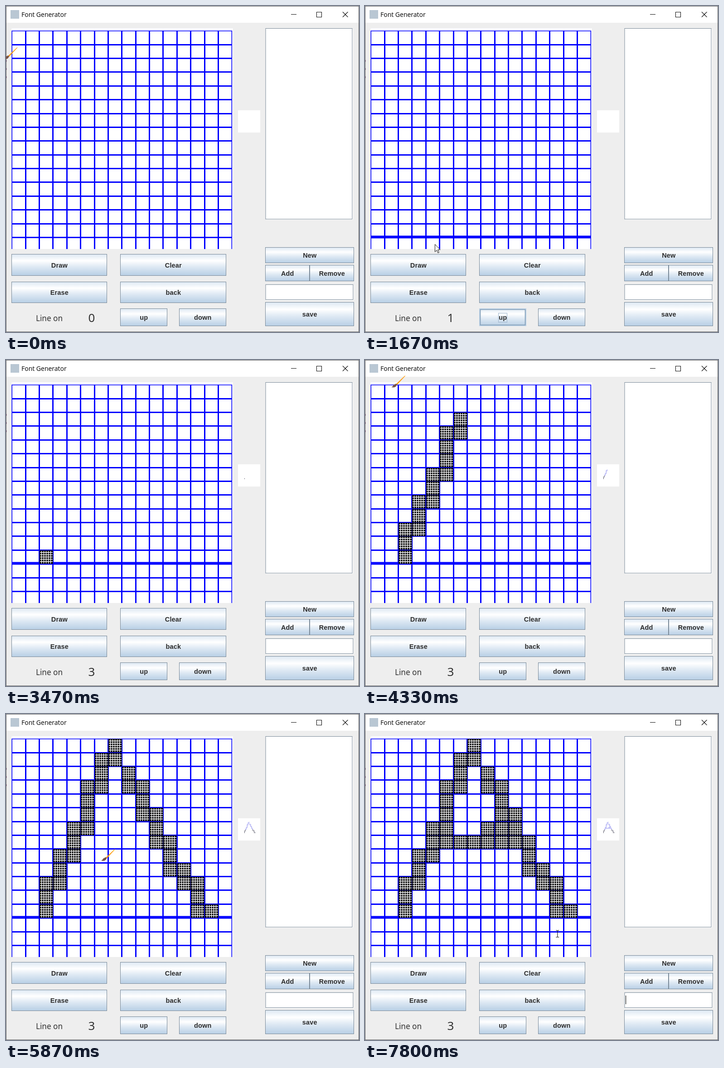
Recreate the animation shown at these times as an HTML page. Size 779 by 719 pixels, loop 8000 ms.

```html
<!DOCTYPE html>
<html lang="en">
<head>
<meta charset="utf-8">
<title>Font Generator</title>
<style>
  html, body { margin: 0; width: 100%; height: 100%; overflow: hidden; background: #eee; }
  svg { display: block; width: 779px; height: 719px; }
  .title { font: 14px "Open Sans", "Noto Sans", sans-serif; }
  .button { font: bold 14.5px "Liberation Sans", Arial, sans-serif; letter-spacing: .15px; fill: #2b2b2b; text-anchor: middle; }
  .label { font-family: "Noto Sans", "Open Sans", sans-serif; fill: #333; text-anchor: middle; }
</style>
</head>
<body>
<svg id="stage" viewBox="0 0 779 719" xmlns="http://www.w3.org/2000/svg">
  <defs>
    <linearGradient id="ocean" x1="0" y1="0" x2="0" y2="1">
      <stop offset="0" stop-color="#dde8f3"/>
      <stop offset=".3" stop-color="#fff"/>
      <stop offset=".6" stop-color="#dde8f3"/>
      <stop offset="1" stop-color="#b8cfe5"/>
    </linearGradient>
    <clipPath id="panel"><rect x="12" y="49" width="489" height="487"/></clipPath>
  </defs>
</svg>
<script>
const stage = document.getElementById('stage');
const LOOP = 8000, FPS = 15, STEPS = LOOP * FPS / 1000;
const CELL = 30.38, LEFT = 12.8, TOP = 54.8, BOTTOM = 536;
const BLUE = '#00f', EDGE = '#7a8a99';

function add(tag, attrs, parent = stage, text = '') {
  const node = document.createElementNS(stage.namespaceURI, tag);
  for (const key in attrs) node.setAttribute(key, attrs[key]);
  node.textContent = text;
  parent.appendChild(node);
  return node;
}
const rect = (x, y, width, height, fill, more, parent) =>
  add('rect', { x, y, width, height, fill, ...more }, parent);
const path = (d, more, parent) => add('path', { d, fill: 'none', ...more }, parent);
const show = (node, on) => node.setAttribute('visibility', on ? 'visible' : 'hidden');
const colX = col => Math.floor(LEFT + col * CELL) + .5;
const rowY = row => Math.floor(TOP + row * CELL) + .5;

// Window frame and title bar
rect(0, 0, 779, 719, '#eee');
rect(0, 0, 779, 37, '#fff');
rect(10, 9, 19, 19, '#b9c7d3');
add('text', { x: 34, y: 24, class: 'title' }, stage, 'Font Generator');
path('M629 18.5h12M685.5 13.5h11v11h-11zM743 13l11.5 11.5M754.5 13l-11.5 11.5', { stroke: '#111', 'stroke-width': 1.1 });
rect(.5, .5, 778, 718, 'none', { stroke: '#666' });
for (let i = 0; i < 3; i++) rect(0, 119 + 18 * i, 1.2, 4, '#4a2848');

// Drawing panel
rect(12.5, 49, 488, 487, '#fff');
const panel = add('g', { 'clip-path': 'url(#panel)' });
let lines = '';
for (let i = 1; i < 16; i++) lines += `M${colX(i)} ${TOP}V${BOTTOM}M13 ${rowY(i)}H499`;
path(lines, { stroke: BLUE, 'stroke-width': 3 }, panel);
path(`M13.2 ${BOTTOM}V55H498.3V${BOTTOM}`, { stroke: BLUE, 'stroke-width': 1.6 }, panel);
const baseline = rect(13, 0, 486, 6, BLUE, {}, panel);

// Preview, list and text field
rect(512, 230, 49, 49, '#fff');
rect(574, 50.5, 192, 421, '#fff');
rect(573, 49.5, 191, 420.5, '#fff', { stroke: EDGE });
const field = { x: 573, y: 614, w: 193, h: 34 };
rect(573, 614.5, 193, 33, '#fff', { stroke: EDGE });
path('M574 648.5H767.5V615', { stroke: '#fff' });
const caret = rect(575, 621, 1.2, 19, '#222');

// Buttons
const buttons = [];
function addButton(text, x, y, w, h) {
  const body = rect(x + .5, y + .5, w - 1, h - 1, 'url(#ocean)', { stroke: EDGE });
  const glow = add('g', {});
  rect(x + 1, y + 1, w - 2, h - 2, 'none', { stroke: '#b8cfe5', 'stroke-width': 2 }, glow);
  rect(x + 2.5, y + 2.5, w - 5, h - 5, 'none', { stroke: '#7f9ab3', 'stroke-width': 1.5 }, glow);
  const dent = path(`M${x + 1} ${y + h}V${y + 1}H${x + w}`, { stroke: EDGE, 'stroke-width': 2 });
  add('text', { x: x + w / 2 + .3, y: y + h / 2 + 5.5, class: 'button' }, stage, text);
  buttons.push({ x, y, w, h, body, glow, dent });
}
['Draw', 'Erase'].forEach((text, i) => addButton(text, 12, 547 + 61 * i, 211, 48 - i));
['Clear', 'back'].forEach((text, i) => addButton(text, 252, 547 + 61 * i, 234, 48 - i));
['up', 'down'].forEach((text, i) => addButton(text, 252 + 130 * i, 667, 104, 39));
['Add', 'Remove'].forEach((text, i) => addButton(text, 572 + 98 * i, 571, 98, 36));
addButton('New', 572, 532, 196, 35);
addButton('save', 572, 653, 196, 53);
const focusBox = rect(294.5, 677.5, 19, 20, 'none', { stroke: '#9db5cc' });
add('text', { x: 95.5, y: 694.5, class: 'label', 'font-size': 17.2 }, stage, 'Line on');
const counter = add('text', { x: 189, y: 697, class: 'label', 'font-size': 26 });

// The hand's route over the window: step, x, y, and whether the pen is down from there
const route = [
  [0, 142, 169], [2, 145, 167], [5, 145, 167], [8, 60, 305],
  [14, 60, 400], [15, 320, 545], [17, 376, 643], [21, 343, 697], [37, 343, 697],
  [40, 290, 560], [45, 128, 360], [46, 60, 380],
  [51, 80, 438, true], [57, 101, 389, true], [61, 165, 246, true], [65, 221.5, 98, true], [69, 235, 68],
  [71, 262, 120, true], [84, 441, 445], [87, 441, 445],
  [96, 173, 287, true], [98, 171, 283, true], [99, 228, 272, true], [103, 300, 270, true], [105, 300, 262, true], [107, 270, 260],
  [108, 400, 380], [111, 710, 585], [113, 688, 640], [115, 681, 646], [STEPS, 681, 646]
];
const clicks = [[23, 25], [30, 31], [34, 36]];
const TYPING = 116;

function handAt(k) {
  const next = Math.max(1, route.findIndex(key => key[0] >= k));
  const [k0, x0, y0, pen] = route[next - 1], [k1, x1, y1] = route[next];
  const u = (k - k0) / (k1 - k0);
  return { x: x0 + (x1 - x0) * u, y: y0 + (y1 - y0) * u, pen };
}
const inside = (p, box) => p.x >= box.x && p.x < box.x + box.w && p.y >= box.y && p.y < box.y + box.h;

// Every square the pen enters is filled shortly afterwards
function addCell(col, row) {
  const group = add('g', {});
  const x = colX(col), y = rowY(row);
  rect(x + .5, y + .5, 29.5, 29.5, '#050505', {}, group);
  let mesh = '';
  for (let i = 1; i < 6; i++) mesh += `M${x + 5 * i} ${y + 1.5}v28M${x + 1.5} ${y + 5 * i}h28`;
  path(mesh, { stroke: '#fff', 'stroke-width': 1.3 }, group);
  rect(522 + 1.93 * col, 238 + 1.93 * row, 1.2, 1.2, row > 8 ? '#222238' : '#6060e8', {}, group);
  return group;
}
const cells = new Map();
for (let k = 0; k < STEPS; k += .02) {
  const { x, y, pen } = handAt(k);
  const col = Math.floor((x - LEFT) / CELL), row = Math.floor((y - TOP) / CELL);
  const id = row * 16 + col;
  if (pen && !cells.has(id)) cells.set(id, { at: k + .6, node: addCell(col, row) });
}
const firstPaint = Math.min(...[...cells.values()].map(cell => cell.at));

// Pointers, each drawn around its own origin
const pointers = { brush: add('g', {}), arrow: add('g', {}), beam: add('g', {}) };
path('M.5 -.5L-18 19.5L-20 17.5L-1 -.5Z', { fill: '#ff9b0b' }, pointers.brush);
path('M-18 19L-20.5 17L-26 20Q-27 23 -30.5 24.5Q-24 26.5 -20.5 23Z', { fill: '#775348' }, pointers.brush);
path('M0 0V16.5L4 13L6.5 19L9 18L6.4 12H11.5Z', { fill: '#fff', stroke: '#111' }, pointers.arrow);
path('M-3.5 -7.5H-1L0 -6.5L1 -7.5H3.5M0 -6.5V6.5M-3.5 7.5H-1L0 6.5L1 7.5H3.5', { stroke: '#111', 'stroke-width': 1.1 }, pointers.beam);

// Pointers appear shrunk towards the corner, apart from where the hand acts
function placePointer(hand) {
  const kind = hand.x < 500 && hand.y < BOTTOM ? 'brush' : inside(hand, field) ? 'beam' : 'arrow';
  const x = (hand.x - 150) / 1.25 + (kind === 'brush' ? 31.6 : 0);
  const y = (hand.y - (kind === 'brush' ? 54 : 40)) / 1.25;
  for (const name in pointers) show(pointers[name], name === kind);
  pointers[kind].setAttribute('transform', `translate(${x} ${y})`);
}

function render(time) {
  const k = Math.floor((time % LOOP + 3.4) * FPS / 1000);
  const hand = handAt(k);
  const pressed = clicks.some(([down, up]) => k >= down && k < up);
  const line = clicks.filter(([, up]) => k >= up).length;
  counter.textContent = line;
  show(baseline, line > 0);
  baseline.setAttribute('y', rowY(16 - line) - 4);
  for (const cell of cells.values()) show(cell.node, k >= cell.at);
  for (const button of buttons) {
    const hover = inside(hand, button), down = hover && pressed;
    button.body.setAttribute('fill', down ? '#b8cfe5' : 'url(#ocean)');
    show(button.dent, down);
    show(button.glow, hover && !down);
  }
  show(focusBox, k >= clicks[0][0] && k < firstPaint);
  show(caret, k >= TYPING);
  placePointer(hand);
}

const start = performance.now();
function tick() {
  render(performance.now() - start);
  requestAnimationFrame(tick);
}
tick();
</script>
</body>
</html>
```
